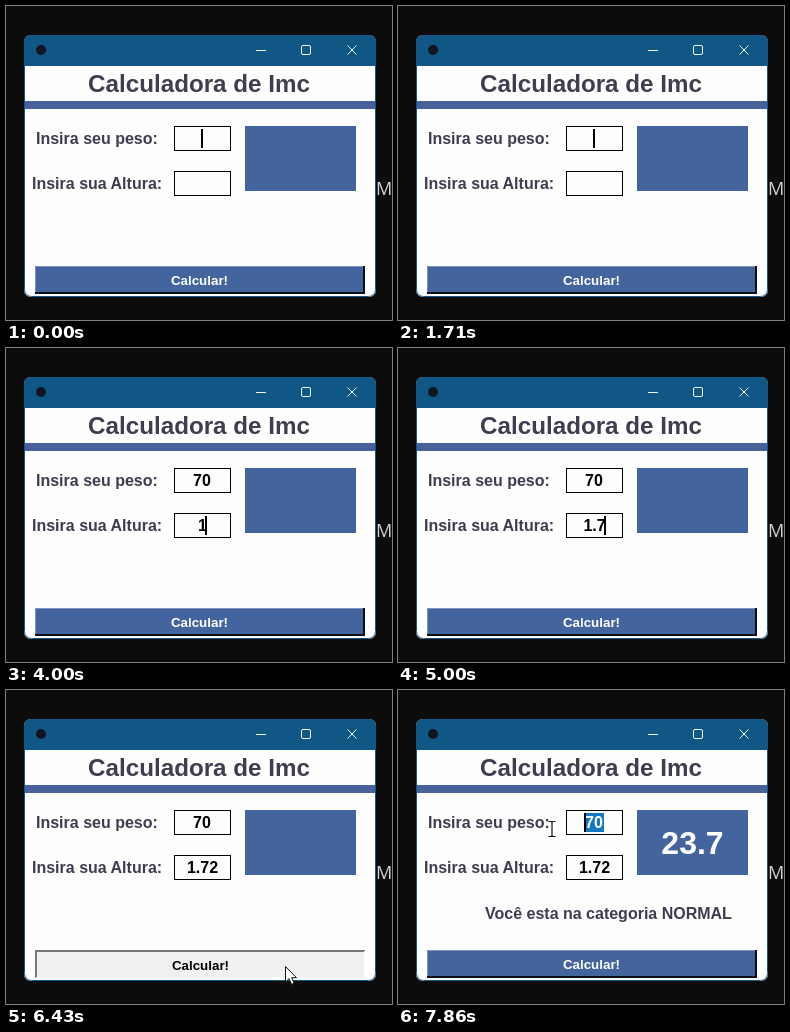
An HTML page that plays this animation: 386 by 314 pixels, repeating every 8000 ms.

```html
<!DOCTYPE html>
<html lang="pt">
<head>
<meta charset="utf-8">
<title>Calculadora de Imc</title>
<style>
html, body { margin: 0; width: 100%; height: 100%; overflow: hidden; background: #0c0c0c; }
svg { display: block; width: 100vw; height: 100vh; }
text { font-family: "Liberation Sans", Arial, sans-serif; font-weight: bold; }
.label { font-size: 16px; fill: #3f3c50; }
.value { font-size: 16px; fill: #000; text-anchor: middle; }
.entry { fill: #fdfdfd; stroke: #000; }
</style>
</head>
<body>
<svg viewBox="0 0 386 314">
  <rect width="386" height="314" fill="#0c0c0c"/>
  <text x="370" y="189" style="font:18px 'Open Sans',sans-serif" fill="#d2d2d2">M</text>

  <clipPath id="frame"><rect x="18" y="29" width="352" height="262" rx="7"/></clipPath>
  <g clip-path="url(#frame)">
    <rect x="18" y="29" width="352" height="262" fill="#fefefe"/>
    <rect x="18" y="29" width="352" height="31" fill="#115786"/>
    <rect x="18" y="95" width="352" height="8" fill="#47629b"/>
  </g>
  <rect x="18.5" y="29.5" width="351" height="261" rx="7" fill="none" stroke="#115786"/>
  <circle cx="35" cy="44" r="5" fill="#10151f"/>
  <g fill="none" stroke="#f2f6f9">
    <path d="M250 44.5h10M341.5 39.5l9 9m0-9l-9 9"/>
    <rect x="295.5" y="39.5" width="9" height="9" rx="1.5"/>
  </g>

  <text x="193" y="86" font-size="24.2" fill="#403d50" text-anchor="middle">Calculadora de Imc</text>
  <text class="label" x="30" y="138">Insira seu peso:</text>
  <text class="label" x="26" y="183">Insira sua Altura:</text>
  <rect class="entry" x="168.5" y="120.5" width="56" height="24"/>
  <rect class="entry" x="168.5" y="165.5" width="56" height="24"/>
  <text class="value" id="weight" x="196" y="138"></text>
  <text class="value" id="height" x="196.5" y="183"></text>
  <clipPath id="selClip"><rect id="selClipBox" y="123" height="19"/></clipPath>
  <g id="selection" clip-path="url(#selClip)">
    <rect x="186" y="123" width="20" height="19" fill="#1478c4"/>
    <text class="value" x="196" y="138" style="fill:#fff">70</text>
  </g>
  <rect id="caret" width="2" height="19" fill="#000"/>

  <rect x="239" y="120" width="111" height="65" fill="#44649d"/>
  <g id="result">
    <text x="294.5" y="164" font-size="32" fill="#fff" text-anchor="middle">23.7</text>
    <text class="label" x="87" y="229">Você esta na categoria NORMAL</text>
  </g>

  <g id="raised">
    <rect x="29" y="260" width="330" height="28" fill="#44649d"/>
    <path d="M29.5 288V260.5H359" fill="none" stroke="#7d93bd"/>
    <path d="M358 260V287H29" fill="none" stroke="#0b0d18" stroke-width="2"/>
  </g>
  <g id="sunken">
    <rect x="29" y="260" width="330" height="28" fill="#f0f0f0"/>
    <path d="M30 288V261H359" fill="none" stroke="#777" stroke-width="2"/>
    <path d="M358.5 261V287.5H30" fill="none" stroke="#fff"/>
  </g>
  <text id="buttonText" y="279" font-size="13.33" text-anchor="middle">Calcular!</text>

  <path id="arrow" d="M.5 .5V16L4 12.6L6.6 18.4L9.1 17.3L6.6 11.7H11.5Z" fill="#fff" stroke="#111"/>
  <path id="beam" d="M-3.5 -7.5H-1Q0 -7.5 0 -6.5Q0 -7.5 1 -7.5H3.5M0 -6.5V6.5M-3.5 7.5H-1Q0 7.5 0 6.5Q0 7.5 1 7.5H3.5" fill="none" stroke="#111" stroke-width="1.2"/>
</svg>
<script>
const LOOP = 8000, TICK = 1000 / 7;
const el = id => document.getElementById(id);
const show = (id, on) => el(id).setAttribute("display", on ? "inline" : "none");
const set = (id, attrs) => { for (const k in attrs) el(id).setAttribute(k, attrs[k]); };

const weightKeys = [[0, ""], [2000, "7"], [2280, "70"]];
const heightKeys = [[0, ""], [3700, "1"], [4280, "1."], [4990, "1.7"], [5280, "1.72"]];
const focusKeys = [[-135, "weight"], [2990, "height"], [7500, "weight"]];
const pointerKeys = [
  [5700, 303, 313], [5990, 292, 291], [6280, 280, 277], [6429, 279, 276],
  [6571, 277, 275], [7000, 271, 273], [7143, 264, 252], [7429, 213, 135],
  [7571, 207, 133], [7714, 190, 136], [7857, 154, 139]
];

const latest = (keys, t) => keys.filter(k => k[0] <= t).pop();

function pointerAt(t) {
  const i = pointerKeys.findIndex(k => k[0] > t);
  if (i < 0) return pointerKeys[pointerKeys.length - 1].slice(1);
  const [t0, x0, y0] = pointerKeys[i - 1], [t1, x1, y1] = pointerKeys[i];
  const p = (t - t0) / (t1 - t0);
  return [x0 + (x1 - x0) * p, y0 + (y1 - y0) * p];
}

// Arial bold advances at 16px
const textWidth = s => [...s].reduce((w, c) => w + (c === "." ? 4.45 : 8.9), 0);

function render(t) {
  const values = { weight: latest(weightKeys, t)[1], height: latest(heightKeys, t)[1] };
  el("weight").textContent = values.weight;
  el("height").textContent = values.height;

  const selLeft = t < 7700 ? 206 : t < 7850 ? 196 : 186;
  show("selection", selLeft < 206);
  set("selClipBox", { x: selLeft, width: 206 - selLeft });

  const [since, field] = latest(focusKeys, t);
  const caretX = t >= 7500 ? selLeft - 0.5 : 195 + textWidth(values[field]) / 2;
  set("caret", { x: Math.round(caretX), y: field === "weight" ? 123 : 168 });
  show("caret", (t - since) % 900 < 600);

  const pressed = t >= 6420 && t < 6565;
  show("raised", !pressed);
  show("sunken", pressed);
  set("buttonText", { x: pressed ? 194.5 : 193.5, y: pressed ? 280 : 279, fill: pressed ? "#000" : "#fff" });
  show("result", t >= 6565);

  const visible = t >= pointerKeys[0][0], overEntry = t >= 7420;
  show("arrow", visible && !overEntry);
  show("beam", visible && overEntry);
  if (visible) set(overEntry ? "beam" : "arrow", { transform: `translate(${pointerAt(t).map(Math.round)})` });
}

const start = performance.now();
function frame() {
  const t = (performance.now() - start) % LOOP;
  render(Math.floor((t + 4) / TICK) % 56 * TICK);
  requestAnimationFrame(frame);
}
frame();
</script>
</body>
</html>
```
